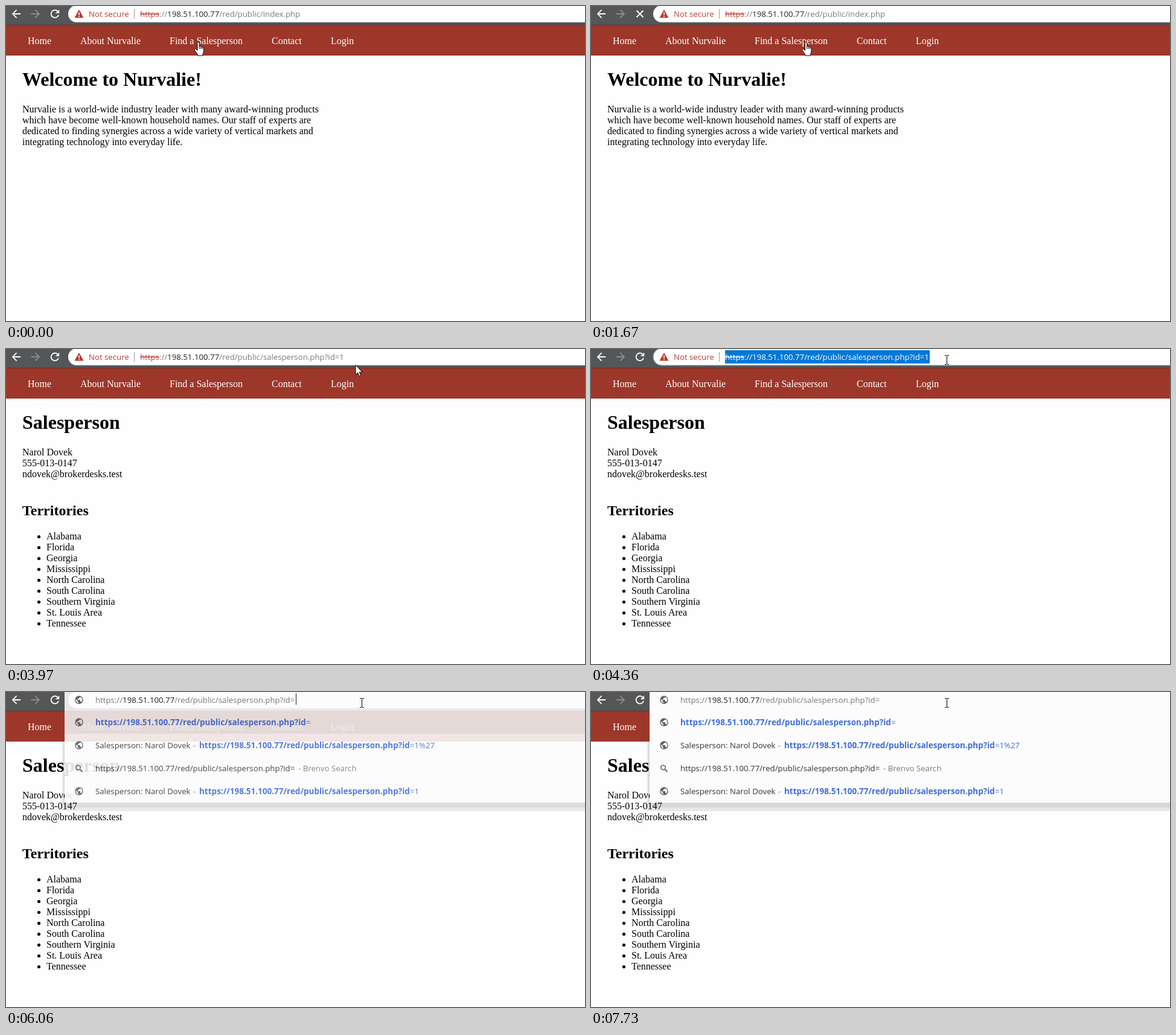
An HTML page for the animation above (8000 ms loop, 959 by 521 pixels).

```html
<!DOCTYPE html>
<html lang="en">
<head>
<meta charset="utf-8">
<title>Browser session</title>
<style>
  html, body { margin: 0; width: 100%; height: 100%; overflow: hidden; background: #fefefe; }
  svg { display: block; }
  text { font: 16px "Liberation Serif", serif; }
  .h1 { font-size: 32px; font-weight: bold; }
  .h2 { font-size: 24px; font-weight: bold; }
  .b { font-weight: bold; }
  .nav { fill: #fff; }
  .link { fill: #1a1aee; text-decoration: underline; }
  .ui { font: 13.22px "Open Sans", "Noto Sans", sans-serif; fill: #333; }
  .red { fill: #b93a32; }
  .struck { fill: #c0453c; text-decoration: line-through; }
  .dim { fill: #777a7d; }
  .host { fill: #222; }
  .match { fill: #416dd6; }
  .match .b { font-size: 13.5px; }
  .selected tspan { fill: #fff; }
</style>
</head>
<body>
<svg id="stage" width="959" height="521" viewBox="0 0 959 521"></svg>
<script>
const LOOP = 8000;
const HOST = "198.51.100.77";
const PERSON = "Narol Dovek";
const PROFILE = "/red/public/salesperson.php?id=";

const text = (x, y, content, cls = "") => `<text x="${x}" y="${y}" class="${cls}">${content}</text>`;
const lines = (x, y, items) => items.map((s, i) => text(x, y + i * 18, s)).join("");
const span = (cls, s) => `<tspan class="${cls}">${s}</tspan>`;
const rect = (x, y, w, h, fill, more = "") =>
  `<rect x="${x}" y="${y}" width="${w}" height="${h}" fill="${fill}" ${more}/>`;
const group = (id, content, more = "") => `<g id="${id}" ${more}>${content}</g>`;
const icon = (path, cx, cy, scale, fill) =>
  `<path d="${path}" fill="${fill}" transform="translate(${cx - 12 * scale} ${cy - 12 * scale}) scale(${scale})"/>`;

const BACK = "M20 11H7.8l5.6-5.6L12 4l-8 8 8 8 1.4-1.4L7.8 13H20z";
const FORWARD = "M4 11h12.2l-5.6-5.6L12 4l8 8-8 8-1.4-1.4 5.6-5.6H4z";
const RELOAD = "M17.65 6.35A8 8 0 1 0 19.73 14h-2.08A6 6 0 1 1 16.22 7.78L13 11h7V4z";
const GLOBE = "M12 2a10 10 0 1 0 0 20 10 10 0 0 0 0-20zm-1 17.9a8 8 0 0 1-6.8-9.7L9 15v1a2 2 0 0 0 2 2z" +
  "m6.9-2.5A2 2 0 0 0 16 16h-1v-3a1 1 0 0 0-1-1H8v-2h2a1 1 0 0 0 1-1V7h2a2 2 0 0 0 2-2v-.4a8 8 0 0 1 2.9 12.8z";
const globe = y => icon(GLOBE, 121, y, .68, "#5f6368");

const address = path => text(222, 18,
  span("struck", "https") + span("dim", "://") + span("host", HOST) + span("dim", path), "ui");

const headings = ["Home", "About Nurvalie", "Find a Salesperson", "Contact", "Login"];
const headingX = [36, 123, 271, 440, 538];

const homePage = text(27, 132, "Welcome to Nurvalie!", "h1") + lines(27, 176, [
  "Nurvalie is a world-wide industry leader with many award-winning products",
  "which have become well-known household names. Our staff of experts are",
  "dedicated to finding synergies across a wide variety of vertical markets and",
  "integrating technology into everyday life."]);

const square = y => rect(52, y - 7, 5, 5, "#000");
const territory = (y, state, person) =>
  text(27, y, state) + square(y + 18) + text(67, y + 18, person, "link");
const region = (y, name, person) => square(y) + text(67, y, name) + text(67, y + 18, person, "link");

const listPage = text(27, 132, "Find a Salesperson", "h1") +
  text(27, 176, "Use the list below to find a salesperson nearby. We are ready to serve you!") +
  text(27, 210, "UNITED STATES", "b") +
  territory(244, "Alabama (AL)", PERSON) +
  territory(296, "Alaska (AK)", "Lorvet Kandolen") +
  territory(348, "Arizona (AZ)", "Iseva Dorlin") +
  territory(400, "Arkansas (AR)", "Emravelle Tisel") +
  text(27, 452, "California (CA)") +
  region(470, "Northern California", "Lorvet Kandolen") +
  region(506, "Southern California", "Penlia Drovase");

const areas = ["Alabama", "Florida", "Georgia", "Mississippi", "North Carolina",
  "South Carolina", "Southern Virginia", "St. Louis Area", "Tennessee"];
const personPage = text(27, 132, "Salesperson", "h1") +
  lines(27, 176, [PERSON, "555-013-0147", "ndovek@brokerdesks.test"]) +
  text(27, 275, "Territories", "h2") + lines(67, 315, areas) +
  areas.map((_, i) => `<circle cx="54.5" cy="${310.5 + i * 18}" r="2.6"/>`).join("");

const suggestion = (x, y, value) => text(x, y,
  span("b", `https://${HOST}${PROFILE.slice(0, -1)}`) + "=" + value, "ui match");
const profileRow = (y, value) => globe(y - 5) + text(148, y, "Salesperson: " + PERSON, "ui") +
  text(310, y, "-", "ui dim") + suggestion(320, y, value);

const panel = rect(93, 82, 866, 115, "#000", 'opacity=".09"') +
  rect(95, 82, 864, 109, "#000", 'opacity=".07"') +
  rect(97, 0, 862, 183, "#fcfcfc") +
  group("activeRow", rect(97, 31, 862, 38, "#000", 'opacity=".06"')) +
  globe(50) + suggestion(148, 55, "") +
  profileRow(93, "1%27") +
  '<path d="M122.5 128l4 4" stroke="#5f6368" stroke-width="1.8"/>' +
  '<circle cx="119.5" cy="125" r="3.7" fill="none" stroke="#5f6368" stroke-width="1.6"/>' +
  text(148, 131, `https://${HOST}${PROFILE}`, "ui") + text(484, 131, "- Brenvo Search", "ui dim") +
  profileRow(169, "1");

const outlined = 'fill="#fff" stroke="#000" stroke-linejoin="round"';
const cursors =
  group("hand", `<path ${outlined} d="M5.5 14.5V2.2a1.6 1.6 0 0 1 3.2 0V8c.8-.8 2.2-.6 2.6.6.9-.7 2.1-.3
    2.4.8 1-.5 2.3 0 2.3 1.6v4.5c0 3-1.6 4-1.8 7.5H6.3C6 20 2.5 17.5.8 13.6c-.5-1.4 1-2.4 2.2-1.5z"/>
    <path d="M8.7 8v4M11.3 8.6v3.4M13.7 9.4V12" stroke="#000" fill="none"/>`) +
  group("arrow", `<path ${outlined} d="M.5.5v16l3.6-3.4 2.6 6 2.5-1.1-2.5-5.8h5z"/>`) +
  group("beam", '<path d="M0 .5h3m1 0h3M3.5 1v14M0 15.5h3m1 0h3" stroke="#000" fill="none"/>');

document.getElementById("stage").innerHTML =
  rect(0, 0, 959, 521, "#fefefe") +
  rect(0, 0, 959, 31, "#545657") +
  rect(0, 31, 959, 51, "#9c372a") + rect(0, 31, 959, 1, "#6e2f28") +
  headings.map((s, i) => text(headingX[i], 63, s, "nav")).join("") +
  group("home", homePage) + group("list", listPage) + group("person", personPage) +
  icon(BACK, 17, 13, .9, "#fff") + icon(FORWARD, 49, 13, .9, "#8b8d8e") +
  group("reload", icon(RELOAD, 81, 13, .9, "#fff")) +
  group("stop", '<path d="M75.5 7.5l11 11m0-11l-11 11" stroke="#fff" stroke-width="2"/>') +
  rect(103, -1, 900, 28, "#fff", 'rx="14" id="pill"') +
  group("siteInfo",
    '<path d="M113.5 19.5L121 6l7.5 13.5z" fill="#b93a32"/><path d="M121 10.5v4.5m0 1.2v1.8" stroke="#fff" stroke-width="1.6"/>' +
    text(137, 18, "Not secure", "ui red") + rect(212, 5, 1, 16, "#96999c") +
    rect(222, 2, 339, 22, "#0078d7", 'id="selection"') +
    group("homeUrl", address("/red/public/index.php")) +
    group("listUrl", address("/red/public/territories.php")) +
    group("personUrl", address(PROFILE + "1"))) +
  group("panel", panel) +
  group("editing", globe(13) + text(148, 18,
    span("dim", "https://") + span("host", HOST) + span("dim", PROFILE), "ui")) +
  rect(0, 2, 1, 19, "#222", 'id="caret"') +
  group("cursor", cursors);

const el = id => document.getElementById(id);
const show = (id, on) => { el(id).style.display = on ? "" : "none"; };
const during = (t, from, to = LOOP) => t >= from && t < to;

// time, pointer shape, left, top
const pointer = [
  [0, "hand", 311.5, 59], [150, "hand", 348, 57], [270, "hand", 381.5, 56.5],
  [420, "arrow", 402, 56], [670, "arrow", 397, 58], [820, "hand", 377.5, 64],
  [970, "arrow", 403, 67], [1090, "arrow", 425, 64], [1240, "hand", 365.5, 59],
  [1390, "hand", 349, 59], [1970, "arrow", 318, 90], [2090, "arrow", 284, 111],
  [2250, "beam", 151, 204], [2400, "beam", 96, 234], [2550, "hand", 87, 264],
  [3690, "arrow", 400, 120], [3820, "arrow", 556, 43], [3970, "arrow", 578.5, 26],
  [4090, "beam", 583, 14], [4210, "beam", 586, 10]
];

function draw(t) {
  const page = t < 1970 ? "home" : t < 3230 ? "list" : "person";
  for (const name of ["home", "list", "person"]) {
    show(name, name === page);
    show(name + "Url", name === page);
  }

  const loading = during(t, 1540, 2090) || during(t, 3110, 3230);
  show("stop", loading);
  show("reload", !loading);

  const focused = t >= 4360, selected = during(t, 4360, 5410), editing = t >= 5940;
  el("pill").setAttribute("fill", during(t, 4090, 4360) ? "#f6f7f8" : "#fff");
  el("pill").setAttribute("stroke", focused ? "#7f9ad6" : "none");
  show("selection", selected);
  el("personUrl").setAttribute("class", selected ? "selected" : "");
  show("siteInfo", !editing);
  show("editing", editing);

  show("panel", t >= 6060);
  show("activeRow", t < 6180);
  el("panel").setAttribute("opacity", t < 6180 ? .89 : 1);

  show("caret", during(t, 5410, 6580) || during(t, 7140, 7730));
  el("caret").setAttribute("x", editing ? 480 : 562);

  const [, shape, x, y] = pointer.findLast(p => p[0] <= t);
  for (const name of ["hand", "arrow", "beam"]) show(name, name === shape);
  el("cursor").setAttribute("transform", `translate(${x} ${y})`);
}

function frame() {
  draw(performance.now() % LOOP);
  requestAnimationFrame(frame);
}
frame();
</script>
</body>
</html>
```
